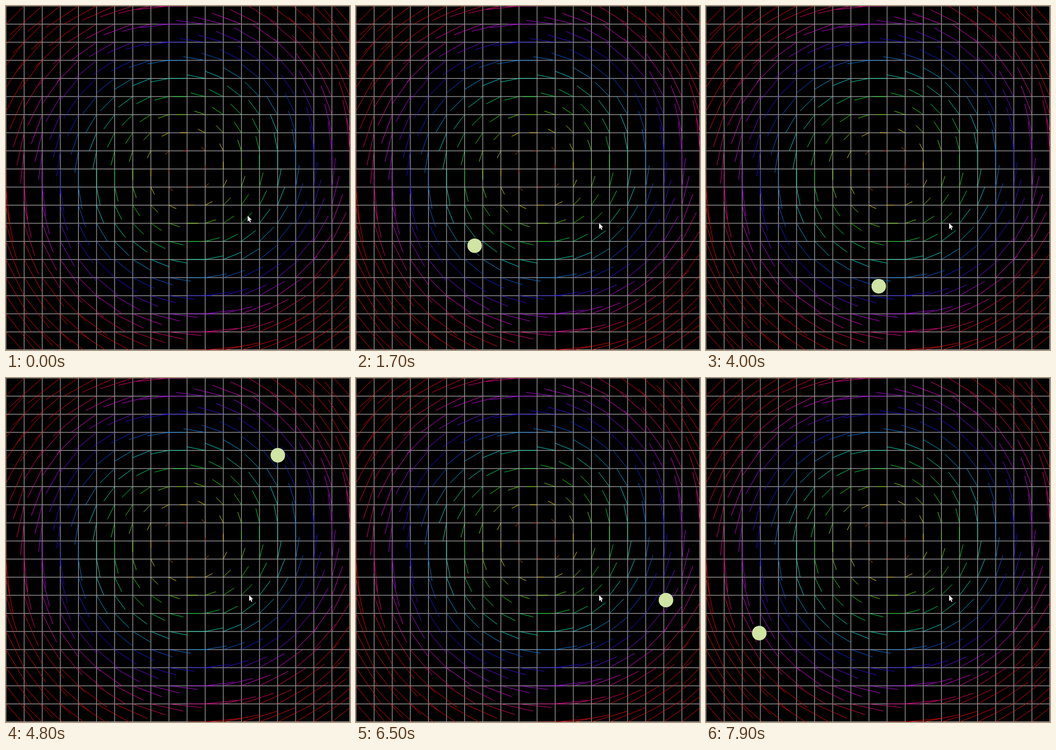
An HTML page with a canvas for the animation above (8000 ms loop, 600x600 px).

```html
<!DOCTYPE html>
<html lang="en">
<head>
<meta charset="utf-8">
<title>Vector field</title>
<style>
  html, body { margin: 0; width: 100%; height: 100%; overflow: hidden; background: #000; }
  canvas { display: block; width: 600px; height: 600px; }
</style>
</head>
<body>
<canvas id="stage" width="600" height="600"></canvas>
<script>
const SIZE = 600, CELLS = 19, STEP = SIZE / CELLS;
const CX = 10 * STEP, CY = 9 * STEP;
const LOOP = 8000, TICK = 100;

const ctx = document.getElementById('stage').getContext('2d');

function makeLayer(draw) {
  const c = document.createElement('canvas');
  c.width = c.height = SIZE;
  draw(c.getContext('2d'));
  return c;
}

function drawGrid(g) {
  g.fillStyle = '#aaa';
  for (let i = 0; i <= CELLS; i++) {
    const p = Math.min(i * STEP, SIZE - 0.5) - 0.5;
    g.fillRect(p, 0, 1.1, SIZE);
    g.fillRect(0, p, SIZE, 1.1);
  }
}

// Each segment ends on a grid point and is perpendicular to its radius.
function drawField(g) {
  g.lineWidth = 1;
  g.globalAlpha = 0.82;
  for (let i = 0; i <= CELLS; i++) {
    for (let j = 0; j <= CELLS; j++) {
      const x = i * STEP, y = j * STEP;
      const dx = x - CX, dy = y - CY;
      const r = Math.hypot(dx, dy) / STEP;
      const hue = Math.max(0, Math.min(360, 39 * (r - 0.75)));
      g.strokeStyle = `hsl(${hue}, 90%, 48%)`;
      g.beginPath();
      g.moveTo(x + 0.2 * dy, y - 0.2 * dx);
      g.lineTo(x, y);
      g.stroke();
    }
  }
}

const backdrop = makeLayer(g => {
  g.fillStyle = '#000';
  g.fillRect(0, 0, SIZE, SIZE);
  drawGrid(g);
  drawField(g);
});

// Outward logarithmic spiral, counter-clockwise on screen.
function drawBall(sec) {
  const dt = sec - 1.7;
  const r = 172.5 * Math.exp(0.0751 * dt);
  const a = (129.1 - 171.76 * dt) * Math.PI / 180;
  ctx.fillStyle = '#d0e4a4';
  ctx.beginPath();
  ctx.arc(CX + r * Math.cos(a), CY + r * Math.sin(a), 12.7, 0, 2 * Math.PI);
  ctx.fill();
}

const ARROW = [[0, 0], [0, 10.5], [2.4, 8.4], [4, 12], [5.6, 11.3], [4.1, 7.8], [7.2, 7.6]];

function drawCursor(x, y) {
  ctx.beginPath();
  for (const [px, py] of ARROW) ctx.lineTo(x + px, y + py);
  ctx.closePath();
  ctx.lineWidth = 1;
  ctx.strokeStyle = '#000';
  ctx.stroke();
  ctx.fillStyle = '#f4f4f4';
  ctx.fill();
}

function render(ms) {
  const t = Math.floor((ms % LOOP) / TICK) * TICK;
  ctx.drawImage(backdrop, 0, 0);
  if (t >= 100) {
    drawBall(t / 1000);
    drawCursor(424, 378.5);
  } else {
    drawCursor(421.5, 365.5);
  }
}

const start = performance.now();
function frame() {
  render(performance.now() - start);
  requestAnimationFrame(frame);
}
frame();
</script>
</body>
</html>
```
